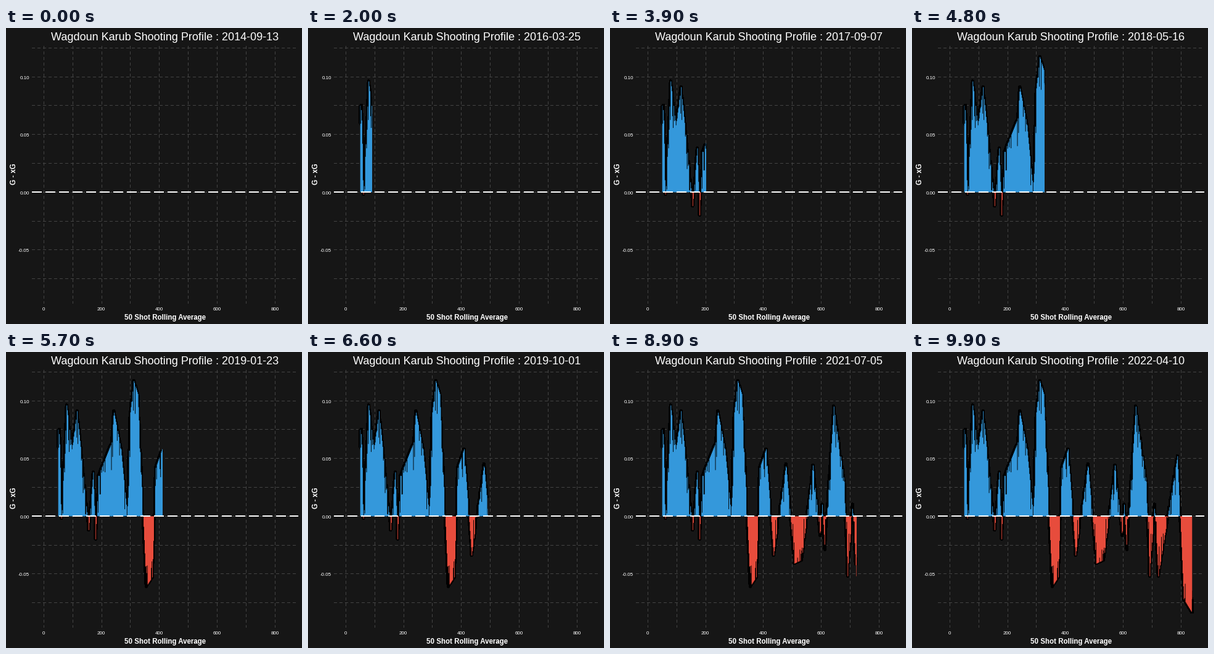
These frames come from a looping animation (480x480 px, 10000 ms). A matplotlib script:

```python
import numpy as np
import matplotlib.pyplot as plt
from matplotlib.animation import FuncAnimation
from matplotlib.transforms import Bbox, TransformedBbox

SIZE, DPI = 480, 72          # one point equals one pixel
FRAMES, INTERVAL = 100, 100
BG, GRID, BLUE, RED = "#161616", "#444444", "#3498db", "#e74c3c"
PLAYER = "Wagdoun Karub"
LEFT, RIGHT, TOP, BOTTOM = 42, 474, 28, 447
X0, Y0, X_UNIT, Y_UNIT = 60.75, 265.8, 0.469, 1872
FIRST, LAST = 50, 839
START, DAYS = np.datetime64("2014-09-13"), 2766

# Hot and cold spells: (shot, G - xG in thousandths)
SPELLS = [
    (50, 75), (55, 75), (62, -2), (80, 96), (98, 58), (116, 91), (156, -12),
    (172, 38), (180, -20), (190, 35), (236, 64), (243, 91), (268, 58),
    (289, 2), (300, 90), (312, 117), (326, 106), (355, -61), (376, -53),
    (388, 42), (410, 58), (436, -34), (479, 45), (508, -41), (533, -38),
    (572, 44), (597, -17), (604, 10), (613, -29), (644, 95), (680, 30),
    (692, -52), (709, 10), (722, -52), (788, 52), (810, -72), (839, -84),
]

# (frame, shots taken) where each season starts and ends
PACE = [
    (12.3, 35), (21.8, 101), (25.3, 101), (35.4, 183), (37.8, 183),
    (47.7, 326), (51.1, 326), (60.9, 463), (63.9, 463), (71.7, 560),
    (75.5, 560), (76.7, 595), (77.6, 595), (87.4, 720), (90.4, 720),
    (99, LAST),
]


def rolling_average():
    """Spells joined by lines, with random single-shot dips towards zero."""
    rng = np.random.default_rng(11)
    shots = np.arange(FIRST, LAST + 1)
    knots, levels = np.transpose(SPELLS)
    trend = np.interp(shots, knots, levels) / 1000
    dips = 0.026 * rng.random(len(shots)) * (rng.random(len(shots)) < 0.4)
    dips[np.isin(shots, knots)] = 0
    return shots, trend - np.sign(trend) * np.minimum(dips, 0.9 * abs(trend))


shots, values = rolling_average()

plt.rcParams["font.family"] = "Liberation Sans"
fig = plt.figure(figsize=(SIZE / DPI, SIZE / DPI), dpi=DPI, facecolor=BG)
ax = fig.add_axes([LEFT / SIZE, 1 - BOTTOM / SIZE,
                   (RIGHT - LEFT) / SIZE, (BOTTOM - TOP) / SIZE], facecolor=BG)
x_lim = (LEFT - X0) / X_UNIT, (RIGHT - X0) / X_UNIT
y_lim = (Y0 - BOTTOM) / Y_UNIT, (Y0 - TOP) / Y_UNIT
ax.set(xlim=x_lim, ylim=y_lim, axisbelow=True,
       xticks=np.arange(0, 801, 100), yticks=np.arange(-3, 6) * 0.025)
ax.grid(color=GRID, lw=1, ls=(0, (4, 4)), antialiased=False)
ax.tick_params(length=0, labelbottom=False, labelleft=False)
ax.spines[:].set_visible(False)


def label(x, y, text, size, ha="center", **kw):
    return fig.text(x / SIZE, 1 - y / SIZE, text, size=size, color="white",
                    ha=ha, va="baseline", **kw)


for n in range(0, 801, 200):
    label(X0 + n * X_UNIT, 458, str(n), 8)
for v in (-0.05, 0, 0.05, 0.1):
    label(38, Y0 - v * Y_UNIT + 4, f"{v:.2f}", 8, ha="right")
label(258, 473, "50 Shot Rolling Average", 11.5, weight="bold")
label(16, 237, "G - xG", 11.5, weight="bold", rotation=90,
      rotation_mode="anchor")
title = label(257.5, 20, "", 18)

line, = ax.plot([], [], color="black", lw=4.4, solid_capstyle="butt",
                solid_joinstyle="round", antialiased=False, zorder=2)

# Every second shot gives one bar per pixel column
bars = [
    ax.fill_between(shots[::2], 0, part[::2], step="mid", color=color, lw=0,
                    antialiased=False, zorder=3)
    for part, color in ((np.maximum(values, 0), BLUE),
                        (np.minimum(values, 0), RED))
]
ax.axhline(0, color="white", lw=2, ls=(0, (7.5, 3)), antialiased=False,
           zorder=4)


def update(frame):
    day = START + int(round(frame * DAYS / (FRAMES - 1)))
    title.set_text(f"{PLAYER} Shooting Profile : {day}")
    end = np.interp(frame, *np.transpose(PACE))
    seen = shots <= end
    line.set_data(shots[seen], values[seen])
    box = Bbox.from_extents(x_lim[0], y_lim[0], end + 1, y_lim[1])
    for bar in bars:
        bar.set_visible(seen.any())
        bar.set_clip_box(TransformedBbox(box, ax.transData))
    return [title, line, *bars]


anim = FuncAnimation(fig, update, frames=FRAMES, interval=INTERVAL,
                     repeat=True, repeat_delay=0)
plt.show()
```
